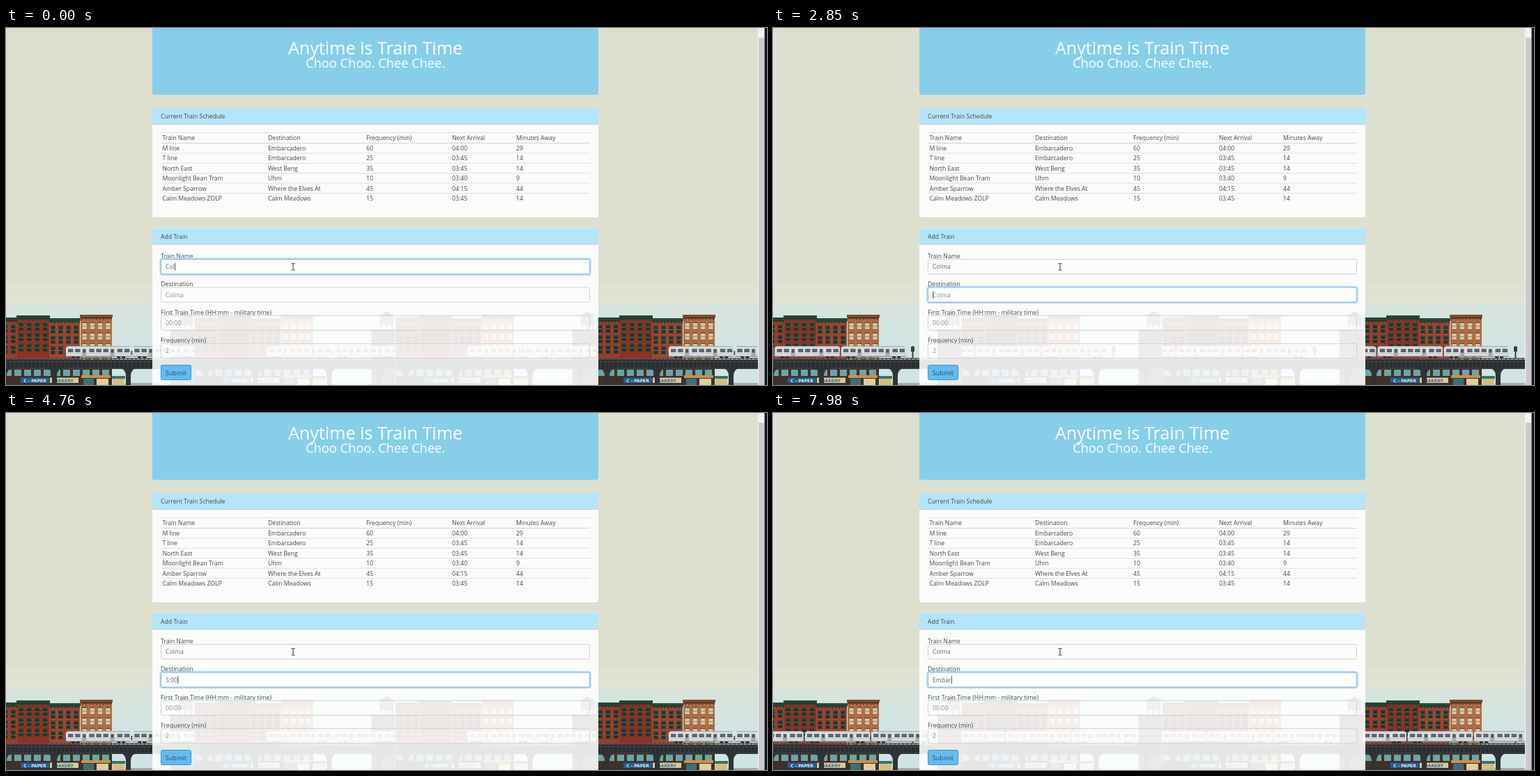
Animation of 1092x513 px, one loop 8 s. Source, as an HTML page with a canvas:

```html
<!DOCTYPE html>
<html lang="en">
<head>
<meta charset="utf-8">
<title>Train schedule</title>
<style>
  html, body { margin: 0; width: 100%; height: 100%; overflow: hidden; background: #dee0cf; }
  canvas, svg { position: absolute; left: 0; top: 0; display: block; }
  text { font: 8.7px "Open Sans", "Noto Sans", sans-serif; fill: #44484b; white-space: pre; }
  .big { font-size: 25.1px; fill: #fff; text-anchor: middle; }
  .sub { font-size: 18.27px; fill: #fff; text-anchor: middle; }
  .button { font-size: 9.1px; fill: #334c5c; }
  .value { fill: #60666b; }
  .hint { fill: #868c91; }
</style>
</head>
<body>
<canvas id="scene" width="1092" height="513"></canvas>
<svg id="page" width="1092" height="513" viewBox="0 0 1092 513"></svg>
<script>
const ctx = document.getElementById('scene').getContext('2d');
const page = document.getElementById('page');
const LOOP = 8000, TILE = 288.33, TILE_LEFT = -18;
const TRAIN = 381, STEP = TILE / 20, STEPS = 48;

function add(tag, attrs, content = '') {
  const el = document.createElementNS('http://www.w3.org/2000/svg', tag);
  for (const key in attrs) el.setAttribute(key, attrs[key]);
  el.textContent = content;
  return page.appendChild(el);
}
const box = (x, y, width, height, fill, extra = {}) => add('rect', { x, y, width, height, fill, ...extra });
const label = (x, y, content, name = '') => add('text', { x, y, class: name }, content);
const fieldY = i => 332.5 + i * 40.4;

// Page
box(210, -10, 640, 106, '#87ceeb', { rx: 3 });
label(530, 37.5, 'Anytime is Train Time', 'big');
label(530, 57, 'Choo Choo. Chee Chee.', 'sub');

function panel(y, height, title) {
  box(210, y, 640, height, '#fff', { rx: 2, 'fill-opacity': .88 });
  box(210, y, 640, 23.5, '#b5e5fa', { rx: 2 });
  box(210, y + 23, 640, 1, '#a9d5e8');
  label(222, y + 15, title);
}
panel(115, 157, 'Current Train Schedule');
panel(287.5, 240, 'Add Train');

const columns = [224.5, 376, 517, 640, 732];
const rows = [
  'Train Name|Destination|Frequency (min)|Next Arrival|Minutes Away',
  'M line|Embarcadero|60|04:00|29',
  'T line|Embarcadero|25|03:45|14',
  'North East|West Beng|35|03:45|14',
  'Moonlight Bean Tram|Uhm|10|03:40|9',
  'Amber Sparrow|Where the Elves At|45|04:15|44',
  'Calm Meadows ZOLP|Calm Meadows|15|03:45|14'
];
rows.forEach((row, i) => {
  const y = i ? 161.6 + i * 14.4 : 161;
  box(222, i ? 150.6 + i * 14.4 : 150, 616, 1, i === 1 ? '#d3d5d4' : '#dfe1df');
  row.split('|').forEach((cell, c) => label(columns[c], y, cell));
});

['Train Name', 'Destination', 'First Train Time (HH:mm - military time)', 'Frequency (min)'].forEach((name, i) => {
  label(222, fieldY(i) - 1.7, name);
  box(222.5, fieldY(i), 615, 21, '#fff', { rx: 2, 'fill-opacity': .15, stroke: '#cfd2d3' });
});
const glow = box(221.5, 0, 617, 23, 'none', { rx: 3, stroke: '#b5d7fb', 'stroke-width': 2.4 });
const ring = box(222.5, 0, 615, 21, '#fff', { rx: 2, 'fill-opacity': .5, stroke: '#80bdf5' });
const values = ['', 'Colma', '00:00', '2'].map((hint, i) => label(229, fieldY(i) + 13.7, hint, 'hint'));
const caret = box(229, 0, .9, 11, '#444');
box(222.5, 484.5, 43, 21, '#62bdec', { rx: 2, stroke: '#3295dc' });
label(228.8, 498.8, 'Submit', 'button');
add('path', { d: 'M409.5 338.5h2l.5.5.5-.5h2M412 339v8.5M409.5 348h2l.5-.5.5.5h2', fill: 'none', stroke: '#333' });

box(1079, 0, 10, 513, '#f1f1f1');
box(1080, 14, 8, 499, '#cbcbcd');
box(1088.5, 0, 4, 513, '#11161c');

// Scenery, drawn once per tile
function rect(color, x, y, w, h) {
  ctx.fillStyle = color;
  ctx.fillRect(x, y, w, h);
}
function building(x, top, width, wall, trim, pane) {
  rect(wall, x, top, width, 513 - top);
  rect(trim, x - 1, top, width + 2, 4);
  rect('#2b2a22', x, top + 4, width, 1.5);
  for (let bx = x + 2; bx < x + width; bx += 5) rect(trim, bx, top + 5, 2, 3);
  const count = Math.round(width / 11), gap = width / count;
  for (let y = top + 12; y < 470; y += 15)
    for (let i = 0; i < count; i++) {
      const wx = x + i * gap + gap / 2 - 3;
      rect(trim, wx - .7, y - 1.5, 7.4, 1.5);
      rect(pane, wx, y, 6, 9);
      rect('#6f8b78', wx, y + 4, 6, .8);
      rect(trim, wx - .7, y + 9, 7.4, 1);
    }
}
function shopSign(x, width, back, ink, words) {
  rect(back, x, 502.5, width, 7.5);
  ctx.fillStyle = ink;
  ctx.font = 'bold 6px "DejaVu Sans", sans-serif';
  ctx.textAlign = 'center';
  ctx.fillText(words, x + width / 2, 508.5);
}
function train(tail) {
  const car = TRAIN / 4;
  for (let i = 0; i < 4; i++) {
    const x = tail + i * car, w = car - 2;
    rect('#55595c', x - 2, 464, 4, 6);
    rect('#aeb3b5', x + 2, 457, w - 4, 2);
    rect('#dfe2e2', x, 458.5, w, 13);
    rect('#b4b9bb', x, 467.5, w, 1);
    rect('#8f9698', x, 471, w, 1.5);
    for (let k = 0; k < 9; k++) {
      const wx = x + 3 + k * 10.1, door = k % 4 === 2;
      rect(door ? '#a6adb0' : '#576875', wx, 461, door ? 6 : 7.5, door ? 10 : 5);
      if (door) rect('#475662', wx + 1, 461.5, 4, 5);
    }
    for (const wx of [8, 15, w - 20, w - 13]) rect('#303437', x + wx, 472, 5, 2.5);
  }
}
function viaduct() {
  rect('#565b5c', TILE_LEFT, 474, TILE, 1.5);
  rect('#2b2e30', TILE_LEFT, 476.5, TILE, 11.5);
  rect('#45494b', TILE_LEFT, 479, TILE, 1);
  rect('#3a3d3f', TILE_LEFT, 488, TILE, 2);
  for (let x = TILE_LEFT; x < 270; x += 6) rect('#3c4042', x, 474, 1.2, 14);
  for (const x of [-6, 66, 172, 244]) {
    rect('#303335', x, 488, 7, 25);
    ctx.fillStyle = '#303335';
    ctx.beginPath();
    ctx.moveTo(x - 10, 488);
    ctx.quadraticCurveTo(x, 490, x, 500);
    ctx.lineTo(x + 7, 500);
    ctx.quadraticCurveTo(x + 7, 490, x + 17, 488);
    ctx.fill();
  }
  rect('#3b3f40', 199.5, 457, 2, 18);
  rect('#3b3f40', 198, 458, 5, 7);
}
function waterTower() {
  rect('#55504a', 236, 433, 34, 80);
  rect('#3e3b37', 235, 433, 35, 3);
  rect('#756960', 248, 414, 20, 13);
  ctx.fillStyle = '#4c4742';
  ctx.beginPath();
  ctx.moveTo(246, 414);
  ctx.lineTo(258, 407);
  ctx.lineTo(270, 414);
  ctx.fill();
  for (const x of [249, 257, 265]) rect('#4c4742', x, 427, 1.5, 6);
}
function drawScene(tail) {
  rect('#dee0cf', 0, 0, 1092, 366);
  const sky = ctx.createLinearGradient(0, 366, 0, 490);
  sky.addColorStop(0, '#e0e2d2');
  sky.addColorStop(.24, '#dfe3d5');
  sky.addColorStop(.27, '#d7e4dd');
  sky.addColorStop(1, '#cfe4e5');
  rect(sky, 0, 366, 1092, 147);
  for (let i = 0; i < 4; i++) {
    ctx.save();
    ctx.translate(i * TILE, 0);
    ctx.beginPath();
    ctx.rect(TILE_LEFT, 366, TILE, 147);
    ctx.clip();
    waterTower();
    building(-18, 416, 34, '#9c3b2a', '#20473a', '#18352d');
    building(16, 413, 46, '#8f3025', '#1f4938', '#17382e');
    building(62, 417, 44, '#a3432e', '#27493a', '#1b382f');
    building(107, 412, 45, '#b06f48', '#80492f', '#d2c7a1');
    rect('#40302a', -18, 490, 170, 23);
    for (let x = -16; x < 150; x += 14) rect(x % 28 ? '#69a6a5' : '#d5ac60', x, 491, 10, 9);
    shopSign(21, 41, '#205f9b', '#f1efe0', 'C - PAPER');
    shopSign(63, 41, '#dbc993', '#276d9f', 'BAKERY');
    rect('#cf8f48', 108, 499, 42, 4);
    rect('#39717a', 111, 504, 15, 9);
    rect('#e0cf9b', 130, 504, 17, 9);
    rect('#2c7a70', 152, 500, 19, 4);
    rect('#d8bd7e', 153, 504, 17, 9);
    rect('#a9aea3', 171, 510, 65, 3);
    viaduct();
    train(tail);
    ctx.restore();
  }
}

// Typing: [time, field, text]
const typing = [
  [0, 0, 'Col'], [460, 0, 'Colm'], [730, 0, 'Colma'], [1500, 1, ''],
  [3310, 1, '5'], [3850, 1, '5:'], [4120, 1, '5:0'], [4390, 1, '5:00'],
  [5280, 1, '5:0'], [5420, 1, '5:'], [5560, 1, '5'], [5800, 1, ''],
  [7160, 1, 'E'], [7430, 1, 'Em'], [7570, 1, 'Emb'], [7700, 1, 'Emba'], [7850, 1, 'Embar']
];
function setValue(i, content, hint) {
  values[i].textContent = content || hint;
  values[i].setAttribute('class', content ? 'value' : 'hint');
}
function drawForm(t) {
  const [since, field, content] = typing.filter(key => key[0] <= t).pop();
  setValue(0, field ? 'Colma' : content, '');
  setValue(1, field ? content : '', 'Colma');
  ring.setAttribute('y', fieldY(field));
  glow.setAttribute('y', fieldY(field) - 1);
  caret.setAttribute('x', 229.3 + (content && values[field].getComputedTextLength()));
  caret.setAttribute('y', fieldY(field) + 5);
  caret.setAttribute('visibility', Math.floor((t - since) / 500) % 2 ? 'hidden' : 'visible');
}

function frame(now) {
  const t = now % LOOP;
  const step = Math.floor((t + 72) / 100) % STEPS;
  drawScene(86 + STEP * (step < 14 ? step : step - STEPS));
  drawForm(t);
  requestAnimationFrame(() => frame(performance.now() - start));
}
const start = performance.now();
frame(0);
</script>
</body>
</html>
```
